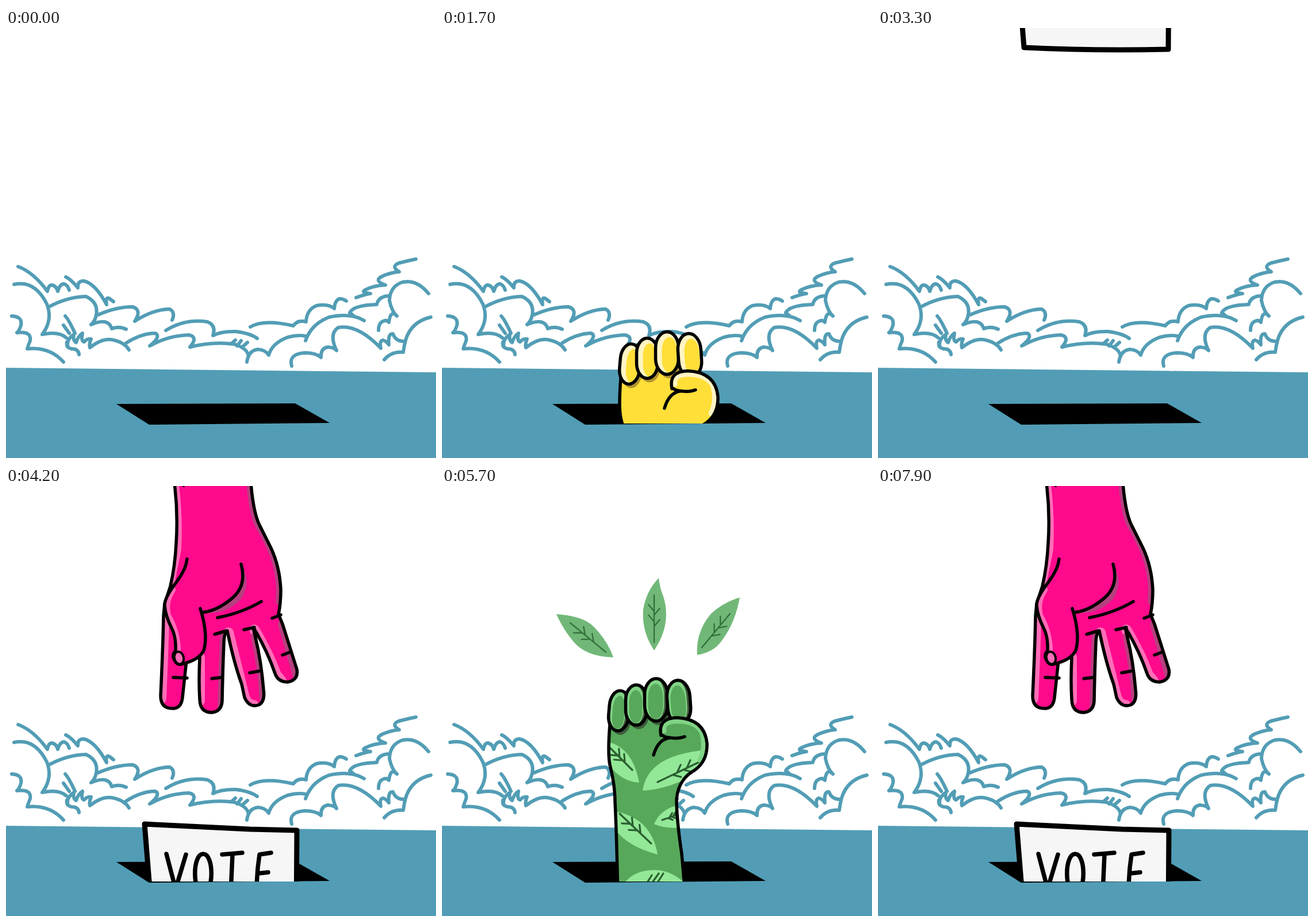
Write an HTML page that moves like this. It is 748 px wide and 748 px high and loops after 8 s.

```html
<!DOCTYPE html>
<html lang="en">
<head>
<meta charset="utf-8">
<title>Vote</title>
<style>
  html, body { margin: 0; width: 100%; height: 100%; overflow: hidden; background: #fff; }
  svg { display: block; width: 100%; height: 100%; }
  path, ellipse { stroke-linecap: round; stroke-linejoin: round; }
  .line { fill: none; stroke: #000; stroke-width: 5.5; }
  .clouds { fill: none; stroke: #529db5; stroke-width: 6; }
  .vein { fill: none; stroke: #35723d; stroke-width: 2.4; }
  .bold .vein { stroke: #2a5f30; stroke-width: 3.2; }
  .pink { fill: #ff0a8c; }
  .glow { fill: none; stroke: #ff6db7; stroke-width: 18; }
  .dusk { fill: none; stroke: #b5407f; stroke-width: 16; }
</style>
</head>
<body>
<svg viewBox="0 0 748 748" role="img" aria-label="VOTE">
  <defs>
    <clipPath id="aboveSlot"><path d="M0 0H748V688H0Z"/></clipPath>
    <path id="palm" d="M291 -20Q300 40 296 100Q294 140 286 174L276 205L274 226Q273 280 269 365Q269 387 290 387Q305 387 307 368L314 303L337 298Q335 340 337 372Q338 394 358 394Q375 392 376 374Q377 320 379 272Q380 252 385 252Q396 306 410 345L415 368Q423 386 439 381Q451 376 448 354Q444 305 434 264L430 246Q453 283 468 326Q473 341 490 341Q509 338 506 319L481 240L474 223Q478 205 478 180Q476 140 461 108L443 72Q429 48 425 -20Z"/>
    <path id="thumb" d="M286 180Q275 196 276 207Q277 225 288 247Q296 262 295 287Q287 294 295 306Q300 313 309 309Q336 302 344 286Q352 258 340 217L336 190L316 150Z"/>
    <clipPath id="palmClip"><use href="#palm"/></clipPath>
    <clipPath id="thumbClip"><use href="#thumb"/></clipPath>
  </defs>

  <path class="clouds" d="M21 415Q48 425 72 458Q74 447 80 447Q88 449 90 458Q94 445 101 445Q107 447 110 456
    M104 433Q113 437 125 452Q124 440 135 440Q155 444 175 481Q173 468 179 470L187 476
    M14 446Q50 438 71 480Q82 508 63 533Q92 527 105 539
    M73 486Q105 468 139 467Q161 477 157 499Q155 510 148 516Q178 503 184 523Q197 518 209 524
    M160 499Q192 485 220 485Q237 490 224 510Q257 489 285 489Q295 495 289 508
    M278 526Q312 505 350 511Q366 517 360 535Q375 527 400 528Q425 531 437 540
    M103 501Q109 507 120 531M100 517L110 531
    M107 553Q106 541 118 533Q116 544 122 547Q126 535 133 531Q130 545 136 546Q141 540 148 541Q144 550 146 556Q166 540 183 542Q206 546 214 560
    M106 546Q104 556 114 558Q126 558 127 568
    M209 548Q236 531 260 531Q270 537 250 553Q282 535 318 534Q335 537 320 555Q360 545 397 550Q420 557 422 571
    M392 549L399 543M402 553L409 544M412 554L420 547
    M419 581Q422 561 438 559Q452 560 457 569Q463 548 490 538Q508 533 521 536
    M521 544Q531 515 562 503Q600 495 623 509
    M10 501Q29 502 26 517Q23 527 19 530Q45 527 42 544Q38 554 37 558Q76 554 100 581
    M425 520Q448 506 500 518Q507 507 522 511Q523 490 540 483Q560 479 571 488Q572 474 580 471Q587 471 592 475
    M609 469Q625 463 634 462Q615 460 626 455Q640 448 660 447Q639 440 654 432Q670 425 684 424Q669 415 683 409Q698 405 713 402
    M735 462Q715 437 690 442Q668 449 667 474Q671 493 680 501Q669 489 666 512Q662 507 656 510Q648 513 648 526
    M668 466Q648 466 645 481Q605 482 598 495L604 500
    M497 588Q491 567 520 565Q539 565 548 573Q547 557 560 555Q572 556 575 561Q561 532 578 521Q612 515 652 557Q649 544 656 543Q662 545 666 551Q664 531 673 532Q678 545 691 545
    M739 503Q700 512 693 552L691 564Q671 562 658 577"/>
  <path fill="#529db5" d="M0 591L748 599V748H0Z"/>
  <path d="M192 654L503 653L563 687L249 690Z"/>

  <g clip-path="url(#aboveSlot)">
    <g id="yellowFist"></g>
    <g id="greenFist"></g>
  </g>
  <g id="rays" fill="#ffdf38"></g>
  <g id="leaves"></g>

  <g class="hand">
    <use href="#palm" class="pink"/>
    <g clip-path="url(#palmClip)">
      <path class="glow" d="M291 -10Q299 50 296 110L276 210Q273 300 270 370M337 298V374M387 255L415 368Q421 381 431 381M432 250Q456 290 470 328L479 339"/>
      <path class="dusk" d="M426 -10Q430 50 443 72Q484 140 477 200M380 260L376 385M434 262Q445 310 449 370M481 240L507 330"/>
      <path fill="#b5407f" d="M410 140Q427 165 410 195Q385 224 343 221Q382 210 398 194Q416 178 410 140Z"/>
    </g>
    <use href="#palm" class="line"/>
    <path class="line" d="M409 136Q420 175 390 198Q365 218 340 220M368 229Q410 221 444 201M363 258L383 252M414 250L432 246M463 230L478 224M291 333L315 334M358 335L375 333M424 325L440 322M481 294L494 289M306 -3L309 -1"/>
  </g>
  <g clip-path="url(#aboveSlot)">
    <g id="card" fill="none" stroke="#000">
      <path fill="#f6f6f6" stroke-width="9" d="M241 588L424 597L506 599L505 752Q380 755 254 749Z"/>
      <path stroke-width="7.5" d="M279 640L295 701L313 641M343 640C324 640 324 708 343 708C362 708 362 640 343 640M376 641L411 638M394 641L391 706M461 638L441 641Q436 672 436 706L461 704M438 674L456 672"/>
    </g>
  </g>
  <g class="hand">
    <use href="#thumb" class="pink"/>
    <g clip-path="url(#thumbClip)"><path class="glow" d="M286 180Q272 200 278 226Q296 258 295 290"/></g>
    <path class="line" d="M315 127Q313 145 298 165Q275 195 276 208Q277 225 288 247Q296 262 295 287Q287 294 295 306Q300 313 309 309Q336 302 344 286Q352 258 338 213"/>
    <ellipse cx="301" cy="299" rx="8" ry="11" transform="rotate(-15 301 299)" fill="#ff6db7" stroke="#000" stroke-width="4"/>
  </g>
</svg>
<script>
const $ = id => document.getElementById(id);

// Leaf vein: a midrib with alternating twigs pointing back to its start.
function vein(x1, y1, x2, y2, twig = 15) {
  const angle = Math.atan2(y1 - y2, x1 - x2);
  let d = `M${x1} ${y1}L${x2} ${y2}`;
  [0.34, 0.42, 0.56, 0.66].forEach((k, i) => {
    const x = x1 + (x2 - x1) * k, y = y1 + (y2 - y1) * k;
    const turn = angle + (i % 2 ? 0.7 : -0.7);
    d += `M${x} ${y}l${Math.cos(turn) * twig} ${Math.sin(turn) * twig}`;
  });
  return `<path class="vein" d="${d}"/>`;
}

// Centre, half width, half height and tilt of each finger.
const fingers = [[308, 391, 17.5, 35, 5], [338, 381, 18.5, 35, 0], [372.5, 372, 20, 37, 0], [412, 376, 20, 38, -4]];
const capsule = ([x, y, rx, ry, tilt], attrs) =>
  `<rect x="${x - rx}" y="${y - ry}" width="${rx * 2}" height="${ry * 2}" rx="${rx}" ry="${ry * 0.75}" transform="rotate(${tilt} ${x} ${y})" ${attrs}/>`;

function fist({ base, light, rim, shadow, shift, pattern }, id) {
  const arm = 'M292 415Q288 465 292 485Q301 520 301 550Q304 610 306 720H424L417 640Q408 580 408 545Q411 510 440 494Q462 478 461 448Q457 405 415 402L395 380L310 395Z';
  const thumb = 'M381 414Q382 404 403 403Q446 401 457 426L461 448L422 437Q393 443 384 434Q379 430 381 414Z';
  const finger = f => {
    const [x, y, rx, ry, tilt] = f;
    return capsule(f, `fill="${rim}"`)
      + capsule([x - 3, y, rx - 3, ry, tilt], `fill="${light}"`)
      + capsule([x + shift, y + 3, rx - 7, ry - 6, tilt], `fill="${base}"`)
      + capsule(f, 'class="line"');
  };
  return `<clipPath id="${id}"><path d="${arm}"/></clipPath>
    <path d="${arm}" fill="${base}"/>
    <g clip-path="url(#${id})">${pattern}
      ${fingers.slice(0, 3).map(([x, y, ...r]) => capsule([x + 4, y + 7, ...r], `fill="${shadow}"`)).join('')}
    </g>
    ${fingers.map(finger).join('')}
    <path d="${thumb}" fill="${base}"/>
    <path d="M386 426Q383 411 404 409Q440 407 452 428Q460 455 449 477" fill="none" stroke="${light}" stroke-width="9"/>
    <path class="line" d="M292 415Q288 465 292 485Q301 520 301 550Q304 610 306 720M424 720L417 640Q408 580 408 545Q411 510 440 494Q462 478 461 448Q457 405 408 403Q375 404 381 434M368 468Q376 440 397 438Q412 440 422 436M384 434Q387 437 397 438"/>`;
}

const forearmLeaves = `<g class="bold"><g fill="#93e897">
  <path d="M288 445Q332 455 343 516Q310 514 288 482Z"/>
  <path d="M349 530Q358 466 465 459V486Q405 527 349 530Z"/>
  <path d="M300 566Q364 577 375 641Q322 627 300 596Z"/>
  <path d="M369 588Q380 561 415 554V594Q390 597 369 588Z"/>
  <path d="M316 692Q334 668 370 668Q398 668 424 692V710H316Z"/></g>`
  + vein(293, 456, 331, 494) + vein(452, 478, 375, 515) + vein(309, 570, 364, 622)
  + vein(412, 571, 383, 581, 9) + '<path class="vein" d="M358 688L365 677M367 688L377 674M376 688L385 674"/></g>';

$('greenFist').innerHTML = fist({ base: '#58a85b', light: '#80d485', rim: '#40573c', shadow: '#3c5e3b', shift: -1, pattern: forearmLeaves }, 'greenArm');
$('yellowFist').innerHTML = fist({ base: '#ffdf38', light: '#fff4c4', rim: '#fff4c4', shadow: '#b3942f', shift: 4, pattern: '' }, 'yellowArm');

$('leaves').innerHTML = `<g fill="#71b878">
  <path d="M199 223Q246 226 264 245Q288 269 298 298Q250 297 228 270Q210 248 199 223Z"/>
  <path d="M377 160Q379 178 385 192Q400 240 369 286Q347 253 350 215Q355 183 377 160Z"/>
  <path d="M518 194Q509 243 482 275Q468 290 444 294Q441 254 468 222Q490 202 518 194Z"/></g>`
  + vein(223, 238, 285, 289) + vein(369, 190, 369, 272) + vein(501, 222, 452, 281);

$('rays').innerHTML = '<path d="M202 178L306 300L286 330Z"/><path d="M378 70L396 282H360Z"/><path d="M554 178L470 330L450 300Z"/>';

// Each table holds [ms, offset] pairs, joined linearly.
const hand = [[0, -480], [100, -356], [400, 0], [1100, 0], [1500, -420]];
const card = [[0, -839], [100, -715], [400, -359], [500, -359], [1000, 0], [1200, 144]];
const yellow = [[1500, 387], [1900, 0], [2800, 0], [3200, 387]];
const green = [[1500, 381], [2000, 0], [3200, 0], [3700, 381]];

function at(table, t) {
  if (t <= table[0][0]) return table[0][1];
  const i = table.findIndex(([time]) => time >= t);
  if (i < 0) return table[table.length - 1][1];
  const [t0, a] = table[i - 1], [t1, b] = table[i];
  return a + (b - a) * (t - t0) / (t1 - t0);
}

const move = (el, x, y) => el.setAttribute('transform', `translate(${x} ${y})`);
const show = (el, on) => el.setAttribute('visibility', on ? 'visible' : 'hidden');
const hands = document.querySelectorAll('.hand');
const blink = (t, from, to) => t >= from && t < to && (Math.floor((t - from) / 200) % 2 === 0 || t >= from + 800);

function draw(ms) {
  const t = Math.floor(ms / 100) * 100 % 8000;
  const round = t < 3200 ? 0 : t < 6900 ? 1 : 2;
  const u = t - [0, 3200, 6900][round];
  // The first fist is still sinking when the second round is about to begin.
  hands.forEach(el => move(el, 0, at(hand, u)));
  move($('card'), 0, at(card, u));
  move($('yellowFist'), 19, at(yellow, u));
  move($('greenFist'), 0, at(green, u));
  show($('yellowFist'), round === 0 && u > 1500);
  show($('greenFist'), round === 1 && u > 1500);
  show($('rays'), blink(t, 1900, 2900));
  show($('leaves'), blink(t, 5300, 6500));
}

const start = performance.now();
function tick() {
  draw(performance.now() - start);
  requestAnimationFrame(tick);
}
tick();
</script>
</body>
</html>
```
